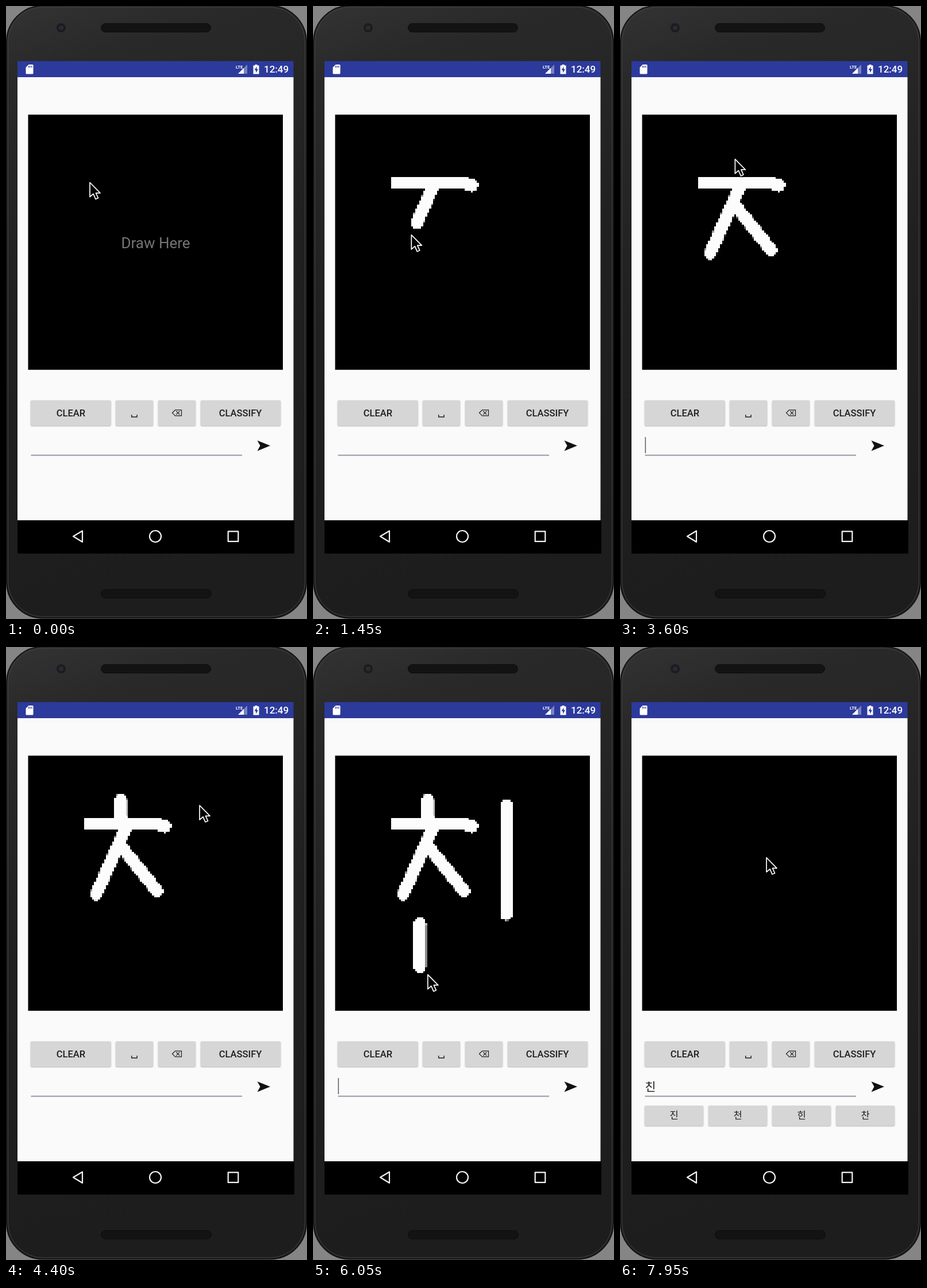
Recreate the animation shown at these times as an HTML page with a canvas. Size 524 by 1068 pixels, loop 8000 ms.

```html
<!DOCTYPE html>
<html lang="en">
<head>
<meta charset="utf-8">
<title>Handwriting pad</title>
<style>
html, body { margin: 0; width: 524px; height: 1068px; overflow: hidden; background: #858585; }
svg, canvas { position: absolute; left: 0; top: 0; display: block; }
#ink { left: 39px; top: 190px; width: 444px; height: 444px; image-rendering: pixelated; }
text { font-family: Roboto, "Liberation Sans", sans-serif; }
.label { font-size: 16.5px; font-weight: 500; fill: #1f1f1f; text-anchor: middle; }
.ko { font-family: "Noto Sans CJK KR", "Noto Sans CJK", "Noto Sans CJK JP", sans-serif; fill: #1f1f1f; }
.key { fill: #d6d6d6; filter: drop-shadow(0 1.2px 1px rgba(0,0,0,.3)); }
#pointer { filter: drop-shadow(1px 2px 1.5px rgba(0,0,0,.35)); }
</style>
</head>
<body>
<svg width="524" height="1068" viewBox="0 0 524 1068">
  <defs>
    <linearGradient id="body" x1="0" y1="0" x2="0.15" y2="1">
      <stop offset="0" stop-color="#333334"/>
      <stop offset=".12" stop-color="#29292a"/>
      <stop offset=".5" stop-color="#202021"/>
      <stop offset="1" stop-color="#1d1d1e"/>
    </linearGradient>
  </defs>
  <rect x="1" y="-.5" width="522" height="1067" rx="63" fill="url(#body)" stroke="#151515" stroke-width="2"/>
  <rect x="3.500" y="2" width="517" height="1062" rx="61" fill="none" stroke="#424242"/>
  <circle cx="96" cy="38" r="8" fill="#1b1c1f"/>
  <circle cx="96" cy="38" r="4" fill="#2a2b31"/>
  <g fill="#131313" stroke="#0d0d0d">
    <rect x="165.500" y="30.500" width="191" height="15" rx="7.500"/>
    <rect x="165.500" y="1016.500" width="192" height="15" rx="7.500"/>
  </g>

  <rect x="20" y="124" width="480.5" height="772" fill="#fafafa"/>
  <rect x="20" y="96" width="480.5" height="28" fill="#2c3a9c"/>
  <rect x="20" y="896" width="482" height="58"/>
  <rect x="38.500" y="189.300" width="443.500" height="444.500"/>

  <path d="M39.5 102H46q1.5 0 1.5 1.5V117q0 1.5-1.5 1.5H36q-1.5 0-1.5-1.5V107Z" fill="#fff"/>
  <path d="M39.5 104v3.5M42 104v3.5M44.7 104v3.5" stroke="#2c3a9c" stroke-width="1.2"/>
  <path d="M420 102V118H404Z" fill="#7882c1"/>
  <path d="M414 108V118H404Z" fill="#fff"/>
  <text x="400" y="108.500" font-size="7.5" font-weight="700" fill="#fff">LTE</text>
  <path d="M433.5 102h4v1.5h3V118.500h-10V103.500h3Z" fill="#fff"/>
  <path d="M436.500 105.500v4.500h2.500l-4 6.500v-4.800h-2.500Z" fill="#2c3a9c"/>
  <text x="449" y="116" font-size="17" font-weight="500" fill="#fff">12:49</text>

  <text id="hint" x="260.500" y="421.500" font-size="26" text-anchor="middle" fill="#757575">Draw Here</text>

  <g class="key">
    <rect x="43" y="687" width="139.500" height="44" rx="2"/>
    <rect x="191" y="687" width="65" height="44" rx="2"/>
    <rect x="265" y="687" width="65" height="44" rx="2"/>
    <rect x="339" y="687" width="139" height="44" rx="2"/>
  </g>
  <text class="label" x="113" y="714.500">CLEAR</text>
  <text class="label" x="408" y="714.500">CLASSIFY</text>
  <path d="M218.700 712v4h9.400v-4" fill="none" stroke="#1f1f1f" stroke-width="1.4"/>
  <path d="M294.500 703.800h11v10h-11l-5-5ZM296.300 705.800l6 6M302.300 705.800l-6 6" fill="none" stroke="#1f1f1f" stroke-width="1.2"/>

  <rect x="43.500" y="781.600" width="367.500" height="2.200" fill="#a1a1ad"/>
  <rect id="caret" x="43.500" y="751" width="1.600" height="28" fill="#666"/>
  <path d="M437.500 757L460 766L437.500 775.200L442.500 766Z" fill="#111"/>

  <g id="result">
    <text class="ko" lang="ko" x="43.500" y="773.500" font-size="20.500">친</text>
    <g id="choices"></g>
  </g>

  <g fill="none" stroke="#f4f4f4" stroke-width="2.200" stroke-linejoin="round">
    <path d="M117 924L133 914.500V933.800Z"/>
    <circle cx="260" cy="924" r="10"/>
    <rect x="386.700" y="915.300" width="17.600" height="17.600"/>
  </g>
</svg>
<canvas id="ink" width="128" height="128"></canvas>
<svg width="524" height="1068" viewBox="0 0 524 1068">
  <path id="pointer" d="M0 0V25L6 19.800L10 29L14.500 27L10.500 18.300H18Z" stroke="#fff" stroke-width="1.700" stroke-linejoin="round"/>
</svg>
<script>
const LOOP = 8000, STEP = 50, LAG = 100, CLASSIFIED = 7300;
const BRUSH = 21, GRID = 128, PAD = { x: 39, y: 190, size: 444 };

function gesture(from, to, d, pen = true) {
  const path = document.createElementNS('http://www.w3.org/2000/svg', 'path');
  path.setAttribute('d', d);
  return { from, to, path, shape: new Path2D(d), length: path.getTotalLength(), pen };
}

// Pen strokes, then the press on CLASSIFY and the resting place
const gestures = [
  gesture(200, 800, 'M146 307.5H262L277 312.5'),
  gesture(1050, 1600, 'M209.5 313L157 431'),
  gesture(2275, 2530, 'M204 352L263 425'),
  gesture(3650, 3950, 'M200 266V300'),
  gesture(4400, 5060, 'M337 276V466'),
  gesture(5700, 6600, 'M186 482V573L272 560L364 560'),
  gesture(6950, 7300, 'M405 728L408 712', false),
  gesture(7950, LOOP, 'M255 367h.1', false)
];

const $ = id => document.getElementById(id);
const hint = $('hint'), caret = $('caret'), result = $('result'), pointer = $('pointer');
const ctx = $('ink').getContext('2d', { willReadFrequently: true });

$('choices').innerHTML = [...'진천힌찬'].map((c, i) => {
  const x = 43 + 111 * i;
  return `<rect class="key" x="${x}" y="799" width="102" height="35" rx="2"/>
    <text class="ko" lang="ko" x="${x + 51}" y="822" font-size="16.5" text-anchor="middle">${c}</text>`;
}).join('');

const progress = (t, from, to) => Math.max(0, Math.min(1, (t - from) / (to - from)));
const smooth = k => k * k * (3 - 2 * k);
const along = (g, t) => g.length * progress(t, g.from, g.to);

function pointerAt(t) {
  const i = gestures.findIndex(g => t < g.to), next = gestures[i];
  const goal = next.path.getPointAtLength(along(next, t));
  if (!i || t >= next.from) return goal;
  const prev = gestures[i - 1], home = prev.path.getPointAtLength(prev.length);
  const k = smooth(progress(t, prev.to, next.from));
  return { x: home.x + (goal.x - home.x) * k, y: home.y + (goal.y - home.y) * k };
}

function drawInk(t) {
  const s = GRID / PAD.size;
  ctx.setTransform(1, 0, 0, 1, 0, 0);
  ctx.clearRect(0, 0, GRID, GRID);
  if (t < gestures[0].from) return;
  ctx.setTransform(s, 0, 0, s, -PAD.x * s, -PAD.y * s);
  ctx.strokeStyle = ctx.fillStyle = '#fcfcfc';
  ctx.lineWidth = BRUSH;
  ctx.lineCap = ctx.lineJoin = 'round';
  ctx.fillRect(136, 297, 11, BRUSH);
  for (const g of gestures) {
    if (!g.pen || t <= g.from) continue;
    ctx.setLineDash([along(g, t), LOOP]);
    ctx.stroke(g.shape);
  }
  hardenEdges();
}

function hardenEdges() {
  const img = ctx.getImageData(0, 0, GRID, GRID), d = img.data;
  for (let i = 0; i < d.length; i += 4) {
    d[i] = d[i + 1] = d[i + 2] = 252;
    d[i + 3] = (d[i + 3] - 80) * 6;
  }
  ctx.putImageData(img, 0, 0);
}

const show = (el, on) => { el.style.visibility = on ? 'visible' : 'hidden'; };

function render(t) {
  const done = t >= CLASSIFIED, blink = t % 1040;
  const { x, y } = pointerAt(t);
  pointer.setAttribute('transform', `translate(${x} ${y})`);
  drawInk(done ? 0 : t - LAG);
  show(hint, t < gestures[0].from + LAG);
  show(caret, !done && blink >= 478 && blink < 998);
  show(result, done);
}

const start = performance.now();
let last = -1;
function tick() {
  const t = Math.floor((performance.now() - start) % LOOP / STEP) * STEP;
  if (t !== last) render(last = t);
  requestAnimationFrame(tick);
}
tick();
</script>
</body>
</html>
```
